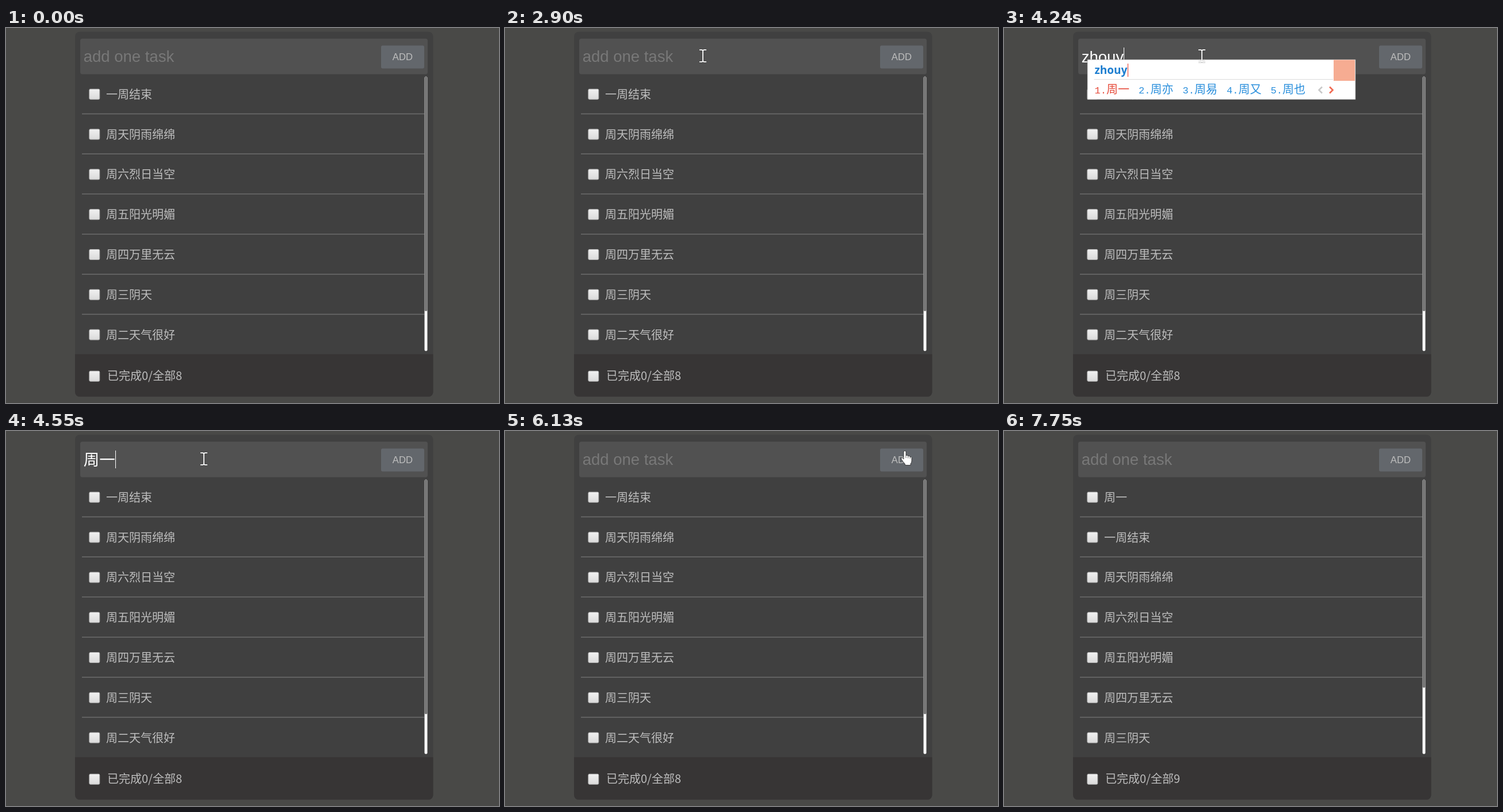
Animation of 857x653 px, one loop 8.3 s. Source, as an HTML page:

```html
<!DOCTYPE html>
<html lang="zh-CN">
<head>
<meta charset="utf-8">
<title>Task list</title>
<style>
  html, body { margin: 0; width: 100%; height: 100%; overflow: hidden; background: #494947; }
  svg { display: block; width: 857px; height: 653px; }
  text { font-family: "Noto Sans CJK SC", "Noto Sans CJK", sans-serif; font-size: 20px; fill: #bebebe; white-space: pre; }
  .latin { font-family: "Liberation Sans", Arial, sans-serif; }
  #hint, #typed { font-size: 27.5px; }
  #hint { fill: #787878; }
  #typed { fill: #fff; font-family: "Liberation Sans", "Noto Sans CJK SC", sans-serif; }
  #pinyin { font: bold 19px "Noto Sans", sans-serif; fill: #1f7fd0; }
  #words text { fill: #2a8fdc; }
  #words text:first-child { fill: #e64c3c; }
  #words .num { font: 17px "Liberation Mono", monospace; }
  #beam path { fill: none; }
</style>
</head>
<body>
<svg viewBox="0 0 857 653">
  <defs>
    <linearGradient id="shine" x2="0" y2="1">
      <stop stop-color="#f1f1f1"/><stop offset="1" stop-color="#dadada"/>
    </linearGradient>
    <rect id="box" x="144.8" y="-9.2" width="18" height="18" rx="2" fill="url(#shine)" stroke="#a9a9a9"/>
    <clipPath id="card"><rect x="120" y="6.5" width="622.5" height="635.5" rx="8"/></clipPath>
  </defs>

  <g clip-path="url(#card)">
    <rect width="857" height="653" fill="#404040"/>
    <rect y="568" width="857" height="85" fill="#373535"/>
  </g>
  <rect x="129" y="18.5" width="604" height="62" rx="4" fill="#515151"/>
  <rect x="652" y="30.5" width="75" height="40" rx="3" fill="#63676c"/>
  <text class="latin" x="671.8" y="55.6" style="font-size:16.67px">ADD</text>

  <g id="rows"></g>
  <rect x="727.5" y="84.5" width="5" height="478" rx="2.5" fill="#f7f7f7"/>
  <rect id="thumb" x="727.5" y="84.5" width="5" rx="2.5" fill="#767676"/>
  <use href="#box" y="606.5"/>
  <text id="count" x="176" y="613"></text>

  <text id="hint" class="latin" x="134.7" y="59">add one task</text>
  <text id="typed" x="134.7" y="60"></text>
  <rect id="caret" y="34" width="1" height="31" fill="#fff"/>

  <g id="ime">
    <rect id="panel" x="135.5" y="50" height="69.5" fill="#fff" stroke="#8a8a8a" stroke-width=".6"/>
    <text id="pinyin" x="148" y="75.3"></text>
    <rect id="mark" y="57" width="1.3" height="23" fill="#ee5a4c"/>
    <path id="rule" fill="none" stroke="#dcdcdc"/>
    <g id="words"></g>
    <g id="side" fill="none" stroke-width="2.6">
      <rect x="-38" y="50.5" width="37" height="36.5" fill="#f6ac92"/>
      <path d="M-58 97.500l-5.500 5.500l5.500 5.500" stroke="#c9c9c9"/>
      <path d="M-45 97.500l5.500 5.500l-5.500 5.500" stroke="#f16a52"/>
    </g>
  </g>

  <g id="cursor">
    <g id="beam">
      <path d="M-6-10.500H6M-6 10.500H6M0-10V10" stroke="#333" stroke-opacity=".3" stroke-width="3.400"/>
      <path d="M-6-10.300H-1.500L0-9.300L1.500-10.300H6M-6 10.300H-1.500L0 9.300L1.500 10.300H6M0-9V9" stroke="#fff" stroke-width="1.800"/>
    </g>
    <g id="hand" transform="translate(-7)">
      <path d="M5 2.500Q5 .5 7 .5T9 2.500V9Q9.500 8 11 8.200Q12.500 8.400 12.700 10Q13.500 9 15 9.500Q16 10 16.200 11.200Q18 10.600 19 12.500V18Q19 21 17 23V25.500H7.500V23.500Q5 21 1.200 15.500Q0 13 2 12.600Q3.500 12.400 5 15Z" fill="#fff" stroke="#222" stroke-width=".8"/>
      <path d="M9 9V13M12.700 10V13.500M16.200 11.200V14" stroke="#444" stroke-width=".8"/>
    </g>
    <path id="arrow" d="M0 0V20L4.600 15.600L8 24L11.500 22.500L8 14.400H14.500Z" fill="#fff" stroke="#222" stroke-width=".8"/>
  </g>
</svg>
<script>
const LOOP = 8300, PITCH = 69.8;
const $ = id => document.getElementById(id);
const show = (id, on) => $(id).setAttribute('visibility', on ? 'inherit' : 'hidden');
const between = (t, a, b) => t >= a && t < b;
const last = (list, t) => list.filter(e => e[0] <= t).pop();

const tasks = ['周一', '一周结束', '周天阴雨绵绵', '周六烈日当空', '周五阳光明媚', '周四万里无云', '周三阴天', '周二天气很好'];

// time, pinyin, candidates, panel shift
const input = [
  [3690, 'z', '在 中 再 这 值'],
  [3740, 'zh', '在 中 再 这 值'],
  [3830, 'zh', '这 中 只 知道 这个'],
  [3910, 'zho', '中 重 种 周 众'],
  [3980, 'zhou', '周 州 洲 粥 轴'],
  [4240, 'zhouy', '周一 周亦 周易 周又 周也', 9.5, 5],
  [4300, "zhou'yi", '周一 周亦 周易 周以 周已', 9.5, 5]
];
const COMMIT = 4550, CLEAR = 6130, ADDED = 6440;
const caretOn = [[1340, 1830], [2330, 2900], [3370, 5120], [5620, 5890]];

// start, end, number of hops, evenly timed points
const moves = [
  [170, 960, 13, [[667, 613], [518, 503], [471, 390], [444, 272], [424, 180], [374, 95], [347, 44]]],
  [1030, 1080, 1, [[348, 42], [347, 39]]],
  [1510, 1590, 1, [[346, 44], [344, 48.5]]],
  [5120, 5950, 14, [[344, 48.5], [350, 80], [377, 113], [440, 115], [545, 113], [635, 102], [680, 68], [695, 34]]],
  [6440, 6750, 5, [[695, 34], [689, 53], [667, 111]]],
  [6750, 7250, 8, [[667, 111], [638, 160], [622, 205], [645, 265], [678, 331]]],
  [7320, 7690, 6, [[690, 375], [712, 458], [750, 565], [794, 633]]]
];

function pointer(t) {
  const move = last(moves, t);
  if (!move || t >= 7750) return null;
  const [start, end, hops, pts] = move;
  const hop = Math.min(hops, Math.floor((t - start) / (end - start) * hops + 0.01));
  const u = hop / hops * (pts.length - 1);
  const i = Math.min(pts.length - 2, Math.floor(u));
  return pts[i].map((v, k) => v + (pts[i + 1][k] - v) * (u - i));
}

function shapeAt(x, y) {
  if (between(x, 652, 727) && between(y, 30, 71)) return 'hand';
  if (between(x, 129, 733) && between(y, 18, 82)) return 'beam';
  return between(x, 129, 733) && between(y, 82, 568) ? 'hand' : 'arrow';
}

function drawCursor(t) {
  const p = pointer(t);
  show('cursor', p);
  const shape = p && shapeAt(...p);
  for (const id of ['beam', 'hand', 'arrow']) show(id, id === shape);
  if (p) $('cursor').setAttribute('transform', `translate(${p})`);
}

let listState, imeState;

function drawList(added) {
  if (listState === added) return;
  listState = added;
  const from = added ? 0 : 1;
  $('rows').innerHTML = tasks.slice(from, from + 7).map((task, i) => {
    const y = 115.5 + i * PITCH;
    const line = i < 6 ? `<path d="M132 ${y + 34}H727.5" stroke="#6d6d6d" stroke-width="1.5"/>` : '';
    return `<use href="#box" y="${y}"/><text x="174" y="${y + 7.3}">${task}</text>${line}`;
  }).join('');
  $('thumb').setAttribute('height', added ? 362.5 : 408.5);
  $('count').textContent = '已完成0/全部' + (added ? 9 : 8);
}

function drawIme(entry) {
  show('ime', entry);
  if (!entry || imeState === entry) return;
  imeState = entry;
  const [, pinyin, list, dx = 0, dy = 0] = entry;
  let x = 148;
  $('words').innerHTML = list.split(' ').map((word, i) => {
    const at = x;
    x += 36.5 + 20 * word.length;
    return `<text x="${at}" y="109"><tspan class="num">${i + 1}.</tspan><tspan x="${at + 20.5}">${word}</tspan></text>`;
  }).join('');
  const right = x + 71;
  $('panel').setAttribute('width', right - 135.5);
  $('rule').setAttribute('d', `M147 84.500H${right - 39}`);
  $('side').setAttribute('transform', `translate(${right})`);
  $('pinyin').textContent = pinyin;
  $('mark').setAttribute('x', 148.5 + $('pinyin').getComputedTextLength());
  $('ime').setAttribute('transform', `translate(${dx} ${dy})`);
}

function drawInput(t) {
  const entry = t < COMMIT ? last(input, t) : null;
  const text = entry ? entry[1] : between(t, COMMIT, CLEAR) ? '周一' : '';
  if ($('typed').textContent !== text) $('typed').textContent = text;
  show('hint', !text);
  show('caret', caretOn.some(([a, b]) => between(t, a, b)));
  const width = text ? $('typed').getComputedTextLength() : 0;
  $('caret').setAttribute('x', Math.round(134.7 + width));
  drawIme(entry);
}

function draw(t) {
  drawList(t >= ADDED);
  drawInput(t);
  drawCursor(t);
}

const begin = performance.now();
function tick() {
  draw((performance.now() - begin) % LOOP);
  requestAnimationFrame(tick);
}
tick();
</script>
</body>
</html>
```
